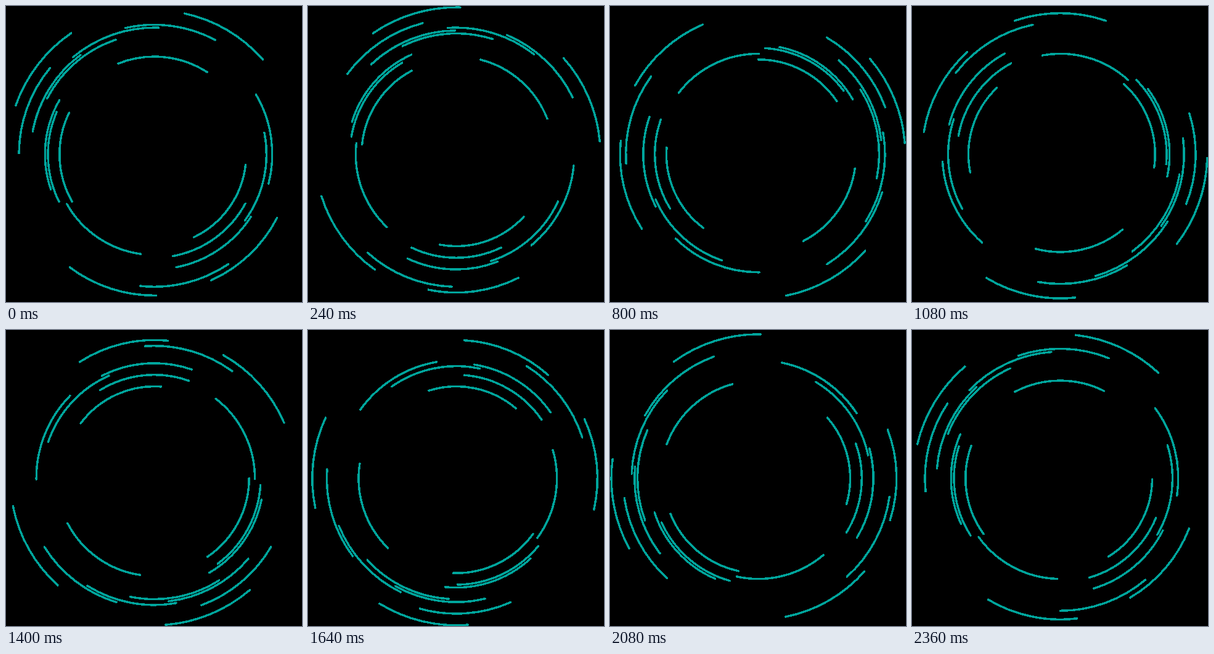
An HTML page for the animation above (2.4 s loop, 480 px wide and 480 px high).

```html
<!DOCTYPE html>
<html lang="en">
<head>
<meta charset="utf-8">
<title>Orbiting arcs</title>
<style>
html, body { margin: 0; width: 100%; height: 100%; overflow: hidden; background: #000; }
svg { display: block; width: 100vw; height: 100vh; }
</style>
</head>
<body>
<svg viewBox="0 0 480 480" shape-rendering="crispEdges">
  <g id="ring" fill="none" stroke="#00a59c" stroke-width="3.5" stroke-linecap="round"></g>
</svg>
<script>
const LOOP = 2400, STEP = 40;
const CENTER = 240.5, INNER = 149, GAP = 4.7, LENGTH = 150;

// Resting direction of each arc in degrees, from the innermost ring outwards
const headings = [
  35.5, 178, 275.5, 124, 54, 178.5, 185.5, 12.5, 56, 352,
  229.5, 212, 251, 277.5, 76, 200, 46.5, 108, 300.5, 217.5
];
const ring = document.getElementById('ring');

function point(r, a) {
  return (r * Math.cos(a)).toFixed(2) + ' ' + (r * Math.sin(a)).toFixed(2);
}

// Every arc has the same length, so the outer ones span a smaller angle
headings.forEach((deg, i) => {
  const r = INNER + GAP * i;
  const mid = deg * Math.PI / 180;
  const half = LENGTH / r / 2;
  const path = document.createElementNS('http://www.w3.org/2000/svg', 'path');
  path.setAttribute('d', `M${point(r, mid - half)}A${r} ${r} 0 0 1 ${point(r, mid + half)}`);
  ring.appendChild(path);
});

// One clockwise turn per loop, advancing 25 times a second
function draw(ms) {
  const t = Math.floor((ms + 1) / STEP) * STEP % LOOP;
  ring.setAttribute('transform', `translate(${CENTER} ${CENTER}) rotate(${360 * t / LOOP})`);
}

function tick(now) {
  draw(now);
  requestAnimationFrame(tick);
}
draw(0);
requestAnimationFrame(tick);
</script>
</body>
</html>
```
